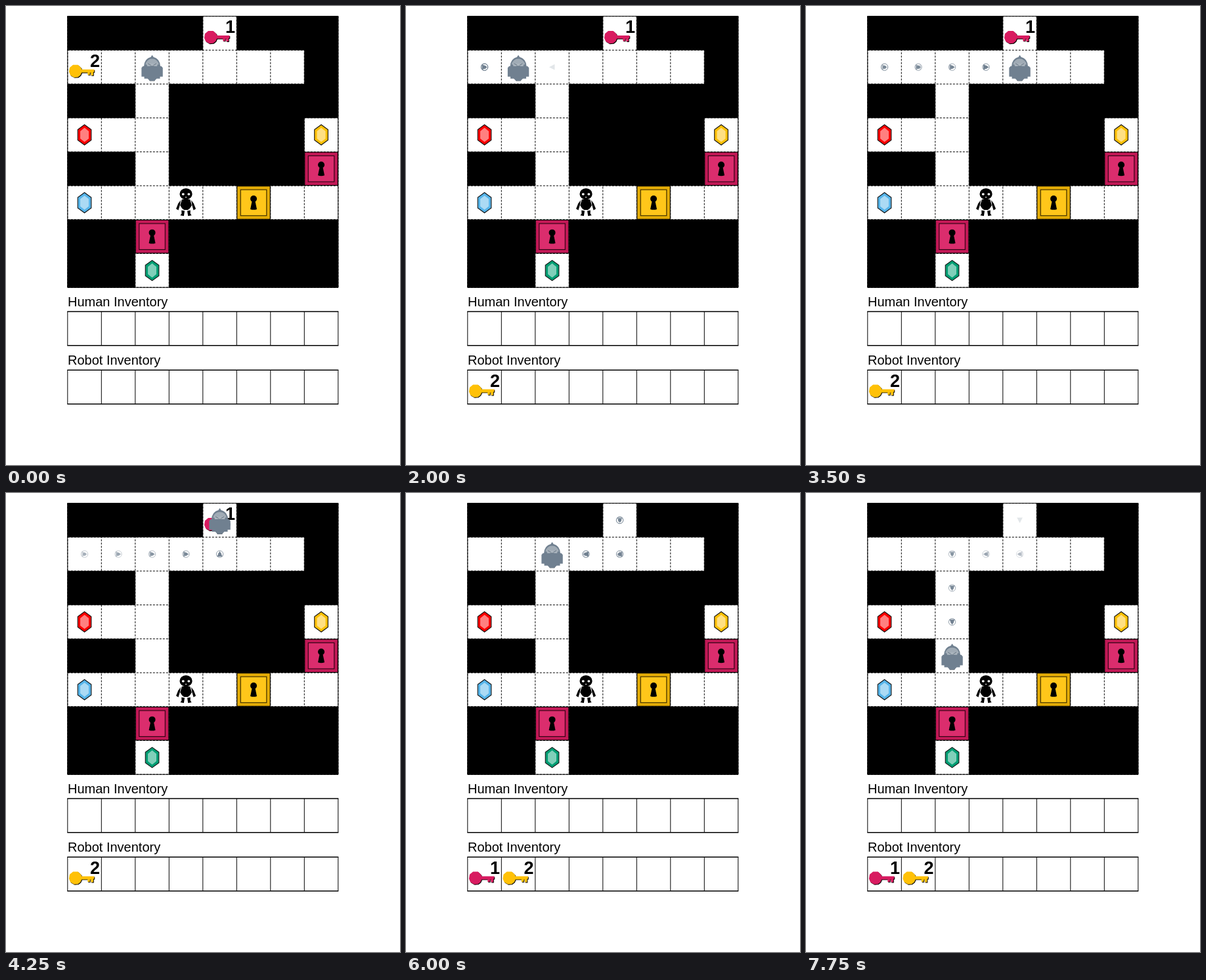
An HTML page that plays this animation: 600 px wide and 700 px high, repeating every 8000 ms.

```html
<!DOCTYPE html>
<html lang="en">
<head>
<meta charset="utf-8">
<title>Keys and gems grid</title>
<style>
  html, body { margin: 0; width: 100%; height: 100%; overflow: hidden; background: #fff; }
  svg { display: block; width: 600px; height: 700px; }
  text { font-family: "Liberation Sans", Arial, sans-serif; fill: #000; }
  .label { font-size: 20px; }
  .num { font-size: 27px; font-weight: bold; }
</style>
</head>
<body>
<svg viewBox="0 0 600 700">
  <defs>
    <g id="gem">
      <path d="M0-15.5 10.3-8V8L0 15.5-10.3 8V-8Z" stroke="#111" stroke-width="1.1"/>
      <path d="M0-10.8 6.5-5.6V5.6L0 10.8-6.5 5.6V-5.6Z" fill="#fff" fill-opacity=".5"/>
    </g>
    <g id="door">
      <rect x="-25.3" y="-25.3" width="50.6" height="50.6" stroke="#000" stroke-width="1.2"/>
      <rect x="-24.6" y="-24.6" width="49.2" height="49.2" fill="#000" fill-opacity=".1"/>
      <rect x="-19.8" y="-19.8" width="39.6" height="39.6" stroke="#000" stroke-opacity=".8" stroke-width="1.1"/>
      <rect x="-19" y="-19" width="38" height="38" fill="#fff" fill-opacity=".08"/>
      <path d="M-2.3-3-5 10Q0 11.8 5 10L2.3-3Z" fill="#000"/>
      <circle cy="-6" r="5" fill="#000"/>
    </g>
    <path id="keyShape" d="M-17.5-3.5-10-3.4-5.2 1 -4.4 3.6H14.8V7.6H13.4V12.6H9.8V8.7H8.2V12H4.8V8.4H-4.4L-6.2 12.4-10 15.4-16 15.8-21.4 12.6-23.6 7.2-22.6.8Z"/>
    <g id="key">
      <use href="#keyShape" x=".9" y=".9" fill="#000"/>
      <use href="#keyShape"/>
    </g>
    <g id="human">
      <path d="M-6.2-5H6.2L8.8 4 6.2 8.4 3 11H-3L-6.2 8.4-8.8 4Z"/>
      <path d="M-8-4-9.4 4.4-11.6 11.6-15 9.2-11.8 1.2Z"/>
      <path d="M8-4 9.4 4.4 11.6 11.6 15 9.2 11.8 1.2Z"/>
      <path d="M-6.8 11.6-2 12.6-3.2 20.4-8.6 19.2-6.6 16.6Z"/>
      <path d="M6.8 11.6 2 12.6 3.2 20.4 8.6 19.2 6.6 16.6Z"/>
      <ellipse cy="-13.3" rx="9.6" ry="8.6"/>
      <g fill="#fff">
        <ellipse cx="-4.3" cy="-12.9" rx="2" ry="1.7"/>
        <ellipse cx="4.3" cy="-12.9" rx="2" ry="1.7"/>
        <ellipse cy="-8.4" rx="1.4" ry=".6"/>
      </g>
    </g>
    <g id="robot">
      <path d="M-5.5 16H5.5L3.8 21.2H-3.8Z" fill="#222"/>
      <path d="M-12.5-1A12.5 14 0 0 1-2.2-15.2L0-18.4 2.2-15.2A12.5 14 0 0 1 12.5-1Z" fill="#708090"/>
      <path d="M-10.4-4A10.6 10.6 0 0 1 10.4-4Z" fill="#a0abb5"/>
      <path d="M-8.5-5.5H8.5L7.5-1.2H-7.5Z" fill="#abb5be"/>
      <path d="M-6.5-5.2-2-3M6.5-5.2 2-3M-3-1.3H3" fill="none" stroke="#657482"/>
      <path d="M-14-1.4H14L16.2 1.2V14.5H12V17.6H7L3.2 21.2H-3.2L-7 17.6H-12V14.5H-16.2V1.2Z" fill="#708090"/>
    </g>
    <path id="arrow" d="M4.6 0-3.9 4.3V-4.3Z" fill="#708090"/>
    <g id="stop">
      <circle r="5.2" fill="none" stroke="#708090" stroke-width=".9"/>
      <circle r="2.5" fill="#708090"/>
    </g>
  </defs>
  <rect width="600" height="700" fill="#fff"/>
  <g id="board"></g>
  <g id="items"></g>
  <g id="trail"></g>
  <use id="bot" href="#robot"/>
  <text class="label" x="94" y="458">Human Inventory</text>
  <text class="label" x="94" y="547">Robot Inventory</text>
</svg>
<script>
const LEFT = 93.8, TOP = 15.6, W = 51.5, H = 51.7;
const PINK = '#d81b60', GOLD = '#ffc107';
const TICK = 250, LOOP = 8000, TRAIL = 12;
const $ = id => document.getElementById(id);

const map = [
  '####.###',
  '.......#',
  '##.#####',
  '...####.',
  '##.####.',
  '........',
  '##.#####',
  '##.#####'
];

function add(parent, tag, attrs, text) {
  const el = document.createElementNS('http://www.w3.org/2000/svg', tag);
  for (const k in attrs) el.setAttribute(k, attrs[k]);
  if (text) el.textContent = text;
  parent.appendChild(el);
  return el;
}
const centre = (c, r) => [LEFT + W * (c + .5), TOP + H * (r + .5)];
const at = (x, y) => `translate(${x} ${y})`;
const put = (parent, id, c, r, fill) =>
  add(parent, 'use', { href: '#' + id, transform: at(...centre(c, r)), fill });
const line = (d, extra) =>
  add($('board'), 'path', { d, fill: 'none', stroke: '#000', ...extra });

function drawInventory(y) {
  let d = '';
  for (let i = 0; i <= 8; i++) d += `M${LEFT + W * i} ${y}v${H}`;
  line(d);
  line(`M${LEFT - .5} ${y}h413m0 ${H}h-413`, { 'stroke-width': 1.5 });
}

function drawBoard() {
  const g = $('board');
  let walls = '', grid = '';
  map.forEach((row, r) => [...row].forEach((ch, c) => {
    if (ch === '#') walls += `M${LEFT + W * c} ${TOP + H * r}h${W}v${H}h${-W}z`;
  }));
  for (let i = 0; i <= 8; i++)
    grid += `M${LEFT + W * i} ${TOP}v${H * 8}M${LEFT} ${TOP + H * i}h${W * 8}`;
  add(g, 'path', { d: walls, stroke: '#000', 'stroke-width': .5 });
  line(grid, { 'stroke-dasharray': '3 2' });
  line(`M${LEFT} ${TOP}h${W * 8}v${H * 8}h${-W * 8}z`);
  put(g, 'gem', 0, 3, '#ff0000');
  put(g, 'gem', 7, 3, GOLD);
  put(g, 'gem', 0, 5, '#56b4e9');
  put(g, 'gem', 2, 7, '#009e73');
  put(g, 'door', 7, 4, PINK);
  put(g, 'door', 2, 6, PINK);
  put(g, 'door', 5, 5, GOLD);
  put(g, 'human', 3, 5, '#000');
  drawInventory(466);
  drawInventory(555.2);
}

function makeKey(num, fill) {
  const g = add($('items'), 'g', {});
  add(g, 'use', { href: '#key', fill });
  add(g, 'text', { class: 'num', x: 8.4, y: 0 }, num);
  return g;
}

// The robot acts on odd ticks and waits on even ones; p = pick up.
const dirs = { R: [1, 0, 0], D: [0, 1, 90], L: [-1, 0, 180], U: [0, -1, -90] };
const path = [[2, 1]], turns = [];
for (const act of 'LLpRRRRUpDLLDDD') {
  const [c, r] = path[path.length - 1], d = dirs[act];
  const next = d ? [c + d[0], r + d[1]] : [c, r];
  path.push(next, next);
  turns.push(d ? d[2] : null, null);
}

drawBoard();
const key1 = makeKey('1', PINK), key2 = makeKey('2', GOLD);

function show(s) {
  const slot = i => [LEFT + W * (i + .5), 581];
  const has1 = s >= 17, has2 = s >= 5;
  key1.setAttribute('transform', at(...(has1 ? slot(0) : centre(4, 0))));
  key2.setAttribute('transform', at(...(has2 ? slot(has1 ? 1 : 0) : centre(0, 1))));
  $('bot').setAttribute('transform', at(...centre(...path[s])));

  const trail = $('trail'), n = Math.min(s, TRAIL);
  trail.replaceChildren();
  for (let i = s - n; i < s; i++) {
    const turn = turns[i], age = s - 1 - i;
    add(trail, 'use', {
      href: turn === null ? '#stop' : '#arrow',
      transform: `${at(...centre(...path[i]))} rotate(${turn || 0})`,
      opacity: n > 1 ? 1 - .8 * age / (n - 1) : 1
    });
  }
}

let last = -1;
const start = performance.now();
function frame(now) {
  const t = Math.max(0, now - start) % LOOP;
  const s = Math.max(0, Math.floor(t / TICK) - 1);
  if (s !== last) show(last = s);
  requestAnimationFrame(frame);
}
frame(start);
</script>
</body>
</html>
```
